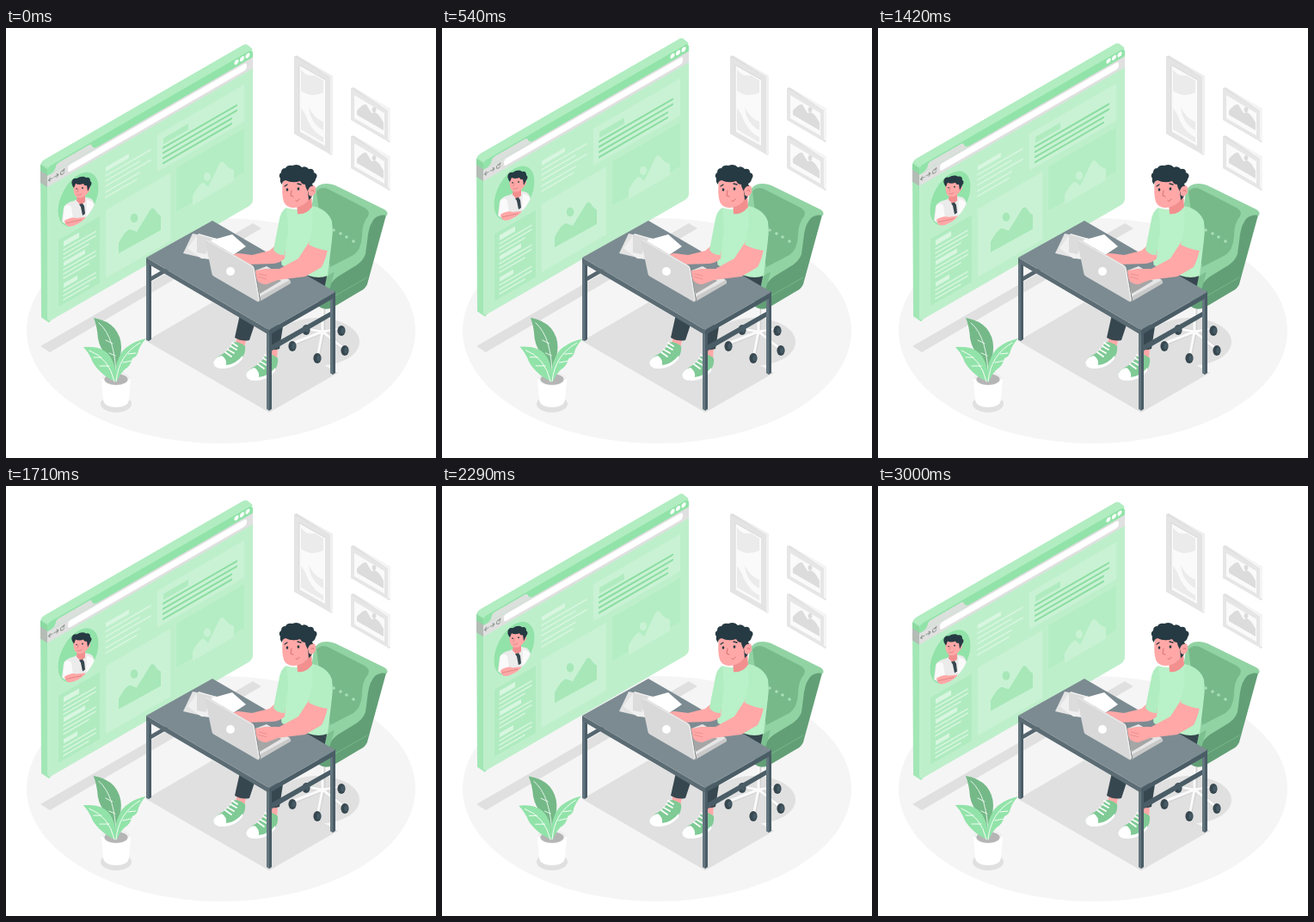
Recreate the animation shown at these times as an HTML page. Size 500 by 500 pixels, loop 3.04 s.

```html
<!DOCTYPE html>
<html lang="en">
<head>
<meta charset="utf-8">
<title>Working at a desk</title>
<style>
html, body { margin: 0; width: 100%; height: 100%; overflow: hidden; background: #fff }
svg { display: block; width: 100vw; height: 100vh }
.line { fill: none; stroke-linecap: round; stroke-linejoin: round }
</style>
</head>
<body>
<svg viewBox="0 0 500 500">
<defs>
  <clipPath id="face"><rect width="239" height="180.500" rx="5"/></clipPath>
  <clipPath id="badge"><ellipse cx="36" cy="58" rx="23.500" ry="28.500" transform="matrix(1 -.577 0 1 48 162)"/></clipPath>
  <g id="picture">
    <path fill="#e0e0e0" d="M401 70l3-1 43 25v38l-2 1z"/>
    <path fill="#f5f5f5" d="M404 69l43 25v38l-3-2V96z"/>
    <path fill="#e6e6e6" d="M401 70l43 26v36l-43-25z"/>
    <path fill="#fafafa" d="M405 78l35 21v26l-35-20z"/>
    <path fill="#dcdcdc" d="M408 96q8-9 11-7l6 10 4-1q4 1 10 12v9l-31-18z"/>
    <ellipse cx="428" cy="95" rx="2.400" ry="3" fill="#dcdcdc"/>
  </g>
  <g id="wheel">
    <ellipse rx="4.600" ry="6" fill="#37474f"/>
    <ellipse cx="1.500" rx="2.200" ry="3.600" fill="#455a64"/>
  </g>
  <g id="shoe">
    <path fill="#7fca95" d="M241 390q1-6 11-11 8-5 12-13l4-1q7 2 10 5 1 8-4 14l-17 11q-11 2-16-5z"/>
    <path fill="#fff" d="M241 389q3-7 10-8 6 4 5 11 11-1 19-11 1 3-1 5-8 9-20 10-12 1-13-7z"/>
    <path class="line" stroke="#fff" stroke-width="1.800" d="M255 377l7 5m-4-8l7 4m-4-8l7 4m-5-8l6 4"/>
  </g>
</defs>

<!-- floor and shadows -->
<ellipse cx="250" cy="352" rx="226" ry="131" fill="#f5f5f5"/>
<path fill="#e0e0e0" d="M40 370L287 227l10 6L51 377zM163 364l77-45 146 82-80 46z"/>
<ellipse cx="362" cy="365" rx="49" ry="28" fill="#e0e0e0"/>

<!-- wall frames -->
<path fill="#dedede" d="M335 33l3-1 42 24v91l-3 1z"/>
<path fill="#f0f0f0" d="M338 32l42 24v91l-3 1V57z"/>
<path fill="#e4e4e4" d="M335 33l42 24v90l-42-24z"/>
<path fill="#fafafa" d="M341 43l30 17v77l-30-17z"/>
<path fill="#ebebeb" d="M343 48q5 9 16 7l10 6v14q-14 7-26-2zM343 93q5 6 8 15 8 15 18 19v6l-26-15zM352 92q6 13 17 17v10q-15-8-17-27z"/>
<path class="line" stroke="#d3d3d3" stroke-width=".8" d="M341 120V43l30 17"/>
<use href="#picture"/>
<use href="#picture" y="56"/>

<!-- floating browser -->
<g id="browser">
  <path fill="#a3e7b6" d="M40 161q0-5 5-8L274 21q4-3 7-1l5 4-20 80L50 342.500l-9-6z"/>
  <path fill="#b1edc1" d="M41 157q1-2 4-4L274 21q4-3 7-1l6 5L51 163q-7-1-10-6z"/>
  <path fill="#8bd9a1" d="M40 159l8 5v11l-8-5z"/>
  <path fill="#b4bcb6" d="M40 166l8 5v14l-8-5z"/>
  <g transform="matrix(1 -.577 0 1 48 162)">
    <g clip-path="url(#face)">
      <path fill="#beefcb" d="M0 0h239v181H0z"/>
      <path fill="#92e3a9" d="M0 0h239v11H0z"/>
      <path fill="#e0e0e0" d="M0 10h239v13H0z"/>
      <path fill="#dbe0dc" d="M5 10q4-1 5-5 0-3 4-3h34q3 0 4 3 1 4 6 5z"/>
    </g>
    <rect x="24" y="12" width="208" height="8" rx="3" fill="#fff"/>
    <g fill="#fff"><circle cx="220" cy="4.500" r="2.600"/><circle cx="226.500" cy="4.500" r="2.600"/><circle cx="233" cy="4.500" r="2.600"/></g>
    <path class="line" stroke="#8f9792" stroke-width="1" d="M6 16H1.500m2-2l-2 2 2 2M8 16h5m-2-2l2 2-2 2M19.500 14.500a2.300 2.300 0 1 0 .3 2.500m0-4v2h-2"/>
    <path fill="#c9f2d4" d="M128 36h101v43H128z"/>
    <path fill="#b4edc3" d="M150 87h79v51h-79z"/>
    <path fill="#c9f2d4" d="M68 89h75v79H68z"/>
    <path fill="#b0ebc0" d="M13 92h48v78H13z"/>
    <path fill="#b0ebc0" d="M135 44h29v7h-29z"/>
    <path class="line" stroke="#8cdda2" stroke-width="2.300" d="M135 55h85m-85 6h85m-85 6h79m-79 6h79"/>
    <path fill="#d8f6e0" d="M68 39h27v5H68zM19 97h18v6H19zM19 121h25v5H19zM19 146h16v5H19z"/>
    <path class="line" stroke="#dcf7e3" stroke-width="1.500" d="M68 49h52m-52 6h39m-39 6h52m-52 7h39m-39 6h36M19 107h37m-37 5h37m-37 5h29M19 130h37m-37 5h37m-37 5h29M19 155h37m-37 5h37m-37 5h29"/>
  </g>
  <path fill="#c9f2d4" d="M217 206v-11q8-15 13-15l5 5 13-27q2-4 5-2 6 8 12 9v13z"/>
  <ellipse cx="234" cy="173" rx="4" ry="5" fill="#c9f2d4"/>
  <path fill="#a7e7b8" d="M131 262v-12q8-15 13-16l8 3 16-26q2-3 5 0 3 6 7 7v17z"/>
  <ellipse cx="149" cy="221" rx="4.300" ry="5.300" fill="#a7e7b8"/>
  <g clip-path="url(#badge)">
    <path fill="#92e3a9" d="M56 160h56v80H56z"/>
    <path fill="#ebebeb" d="M79 201q-10 2-12 8l-2 16q8 7 16 8l19-9 3-18q-1-6-5-8l-8-2z"/>
    <path fill="#fafafa" d="M68 207q6-3 8 1l2 14-12 4zM94 200q7 1 9 6l-2 15-8-3z"/>
    <path fill="#f28f8f" d="M83 194h9v8l-5 4-5-5z"/>
    <path fill="#37474f" d="M85 205l4-1 2 3 1 9-3 2-2-10z"/>
    <path fill="#ffa8a7" d="M79 182q-2 12 4 15 6 2 11-4l4-5-1-9-8-2z"/>
    <path fill="#263a43" d="M79 186q-4-5-2-9 2-3 5-2 7-4 11-1 5-1 5 4 3 2 0 6l-3 6-1-7q-3 1-4-2-5 2-9 0z"/>
    <path fill="#ffa8a7" d="M68 224q8-5 14-3l10-1q2 3-3 5l-14 7q-6-1-7-8z"/>
    <path class="line" stroke="#d77f80" stroke-width=".8" d="M70 227l18-4M83 194q3 1 5-1M84 187l-1 4"/>
    <g fill="#263a43"><circle cx="82" cy="187" r=".8"/><circle cx="89" cy="186" r=".9"/></g>
  </g>
</g>

<!-- chair -->
<path class="line" stroke="#d2d2d2" stroke-width="4.500" d="M369 325v30m0-2l-20-3m20 3l-34 14m34-14l-6 26m6-26l24 20m-24-20l20-3"/>
<path class="line" stroke="#fafafa" stroke-width="3" d="M368 325v30m0-2l-18-3m18 3l-33 13m33-13l-5 25m5-25l24 19m-24-19l19-3"/>
<use href="#wheel" x="349" y="351"/><use href="#wheel" x="333" y="370"/>
<use href="#wheel" x="362" y="384"/><use href="#wheel" x="394" y="375"/><use href="#wheel" x="390" y="352"/>
<path fill="#629f76" d="M443 214l-23 84q-2 5-8 8l-32 19q-9 4-16-1l-2-20 58-90z"/>
<path fill="#92d3a4" d="M358 190q4-9 14-9 8 0 15 4l53 26q5 3 3 7-8-2-14 3-6 6-8 19l-3 23q-3 9-14 15l-18 11q-7 5-11 13l-12-4-10-73z"/>
<path fill="#78b98a" d="M361 190q5-6 13-3l43 22q7 4 4 10-7 8-7 23-1 16-10 22l-27 14-13-65z"/>
<path fill="#7dc190" d="M370 297q4-12 12-13l-5 17q-1 4-5 4z"/>
<path class="line" stroke="#75b888" stroke-width="1" d="M368 312l10 2 42-24"/>
<g fill="#a7dfb7"><circle cx="381" cy="235" r="1.800"/><circle cx="389" cy="239" r="1.800"/><circle cx="396" cy="243" r="1.800"/><circle cx="404" cy="248" r="1.800"/></g>

<!-- legs -->
<path fill="#ffa8a7" d="M269 358h11l-3 14-10-4zM306 370h10l-1 16-11-4z"/>
<path fill="#37474f" d="M272 333l18 9-7 21q-9 2-17-3zM308 342l14 5-4 26q-8 3-14-2z"/>
<use href="#shoe"/>
<use href="#shoe" x="38" y="14"/>
<path fill="#37474f" d="M326 274l48 10-4 20-24 8z"/>

<!-- far side of the desk -->
<path class="line" stroke="#55666f" stroke-width="4.500" stroke-linecap="butt" d="M168 292l20-11.500"/>
<path fill="#4a5d66" d="M377 308l6-2v95l-3 2-3-2z"/>
<path fill="#64767f" d="M377 310h3v93l-3-2z"/>
<path fill="#4a5d66" d="M308 369l69-39v6l-69 40z"/>

<!-- desk -->
<path fill="#64767f" d="M163 268l3 2v94l-3-1zM303 350h3v95l-3-2z"/>
<path fill="#4a5d66" d="M166 270l3 1v91l-3 2zM306 351h3v92l-3 2z"/>
<path fill="#5c6c74" d="M163 267l143 84v6l-143-84z"/>
<path fill="#4a5d66" d="M306 351l77-44v6l-77 44z"/>
<path fill="#7c8b92" d="M163 267l77-43 143 83-77 44z"/>

<!-- papers -->
<path fill="#e3e3e3" d="M206 262l11-23 29 6 2 15-12 9z"/>
<path fill="#f0f0f0" d="M211 256l13-17 31 9-10 21-18-1z"/>
<path fill="#dcdcdc" d="M222 240l18 5-8 18-10-2z"/>
<path fill="#fff" d="M238 247l25-7 16 14-15 10z"/>

<!-- torso -->
<path fill="#b9f1c8" d="M326 209q14 5 30-2 13 2 20 13 5 11 3 26l-5 42q-10 4-22 0l-31-12q-2-4 0-22l-1-25z"/>
<path fill="#ffa8a7" d="M312 254l13 5-1 9q-5 5-13 6l-31 1q-6 3-10 0l-7-9q1-4 8-4l15 2 20-5z"/>
<path fill="#b0edc0" d="M326 209q-7 3-9 18l-6 31q4 6 13 6l4-30z"/>

<!-- laptop -->
<path fill="#c9c9c9" d="M295 318l36-21v-3l-26-15-19 6z"/>
<path fill="#e6e6e6" d="M292 314l38-21-27-16-18 7z"/>
<path fill="#a6a6a6" d="M295 309l25-15-16-10-16-3z"/>

<!-- typing arm -->
<path fill="#ffa8a7" d="M353 248l22 5q-3 16-8 25l-19 11-32 4-13 5q-8 0-12-6l-7-3q-3-4 2-6l15-3 17 0 22-12z"/>
<path class="line" stroke="#e58c8d" stroke-width=".8" d="M293 289l10 3m-9-6l9 2"/>
<path fill="#b3efc3" d="M358 208q16 3 21 17 2 14-3 34-12-1-24-7l5-24q-2-16 1-20z"/>
<path fill="#6b7478" d="M287 277l2 1 7 39-2 1z"/>
<path fill="#d9d9d9" d="M231.500 247.500q0-3 3-1.500l52 30q2 1 2.500 4l6 36q0 3-3 2l-50-29q-2-1-2.500-3z"/>
<path class="line" stroke="#f0f0f0" stroke-width="1" d="M233 246.500l53 30.500q2 2 2 4l6 35"/>
<circle cx="261" cy="283" r="5" fill="#fff"/>

<!-- head -->
<path fill="#f28f8f" d="M338 202l17-8 1 14q-8 10-17 8z"/>
<path fill="#ffa8a7" d="M322 177q-2 15 1 25 3 7 11 7 9 0 16-7l4-8q6-1 6-8-1-5-6-2l-3-10z"/>
<path fill="#263a43" d="M321 182q-3-3-2-7-3-4 1-7 0-5 5-5 2-4 8-3 7-3 11 2 5-2 8 2 6-1 6 4 6 2 2 8-1 4-4 5 4 8-1 16l-3 3-1-10q-3-5-3-8-4 0-6-4-9 3-17-1-4 1-4 5z"/>
<path fill="#ffa8a7" d="M351 189q2-6 7-5 4 4 1 9-4 5-7 1z"/>
<path class="line" stroke="#263a43" stroke-width="1.300" d="M324 184l3-2m12-1l4 1"/>
<g fill="#263a43"><ellipse cx="327" cy="188" rx="1.300" ry="1.700"/><ellipse cx="340" cy="187" rx="1.400" ry="1.800"/></g>
<path class="line" stroke="#d77072" stroke-width="1" d="M332 189l-1 6 3 1m3 5q3 1 4-2M355 189q2-2 3 1"/>

<!-- plant -->
<ellipse cx="128" cy="437" rx="18" ry="10" fill="#e0e0e0"/>
<path fill="#fff" d="M111 408h34l-2 25q-2 8-15 8t-15-8z"/>
<ellipse cx="128" cy="408" rx="17" ry="9" fill="#f0f0f0"/>
<ellipse cx="128" cy="408.500" rx="13.500" ry="6.500" fill="#b5b5b5"/>
<g id="leaves">
  <path fill="#75b988" d="M102 337q16 3 24 12 8 10 8 22 0 10-4 22l-3 14q-2-16-9-25-9-9-11-21-1-14-5-24z"/>
  <path class="line" stroke="#effaf2" stroke-width=".9" d="M108 343q20 17 20 66m-12-46l8 4m-4 11l7 3"/>
  <path fill="#92e3a9" d="M127 411q-10-4-18-12-8-8-10-15-4-8-9-13 14-1 22 3 12 6 15 24z"/>
  <path class="line" stroke="#fff" stroke-width=".9" d="M97 375q23 9 29 36m-24-28l9 0m-2 10l11 0"/>
  <path fill="#92e3a9" d="M127 411q-1-17 4-27 4-10 11-14 8-6 21-9-6 6-9 14-1 7-7 9-2 9-9 13-6 6-9 14z"/>
  <path class="line" stroke="#fff" stroke-width=".9" d="M156 366q-25 14-28 45m14-32l9-1m-15 11l10-2"/>
</g>
<path class="line" stroke="#fff" stroke-width="2.500" d="M112 409q3 8 16 8t16-8"/>
</svg>
<script>
const browser = document.getElementById('browser');
const leaves = document.getElementById('leaves');
const LOOP = 3040;
// Linear zigzag: 0 at whole phases, 1 halfway between
const zigzag = phase => 1 - Math.abs(2 * (phase % 1) - 1);

function draw() {
  const phase = performance.now() / LOOP;
  const lift = -10 * zigzag(phase * 2);
  const sway = 2 * zigzag(phase + .25) - 1;
  browser.setAttribute('transform', `translate(0 ${lift})`);
  leaves.setAttribute('transform', `rotate(${sway} 128 411)`);
  requestAnimationFrame(draw);
}
draw();
</script>
</body>
</html>
```
